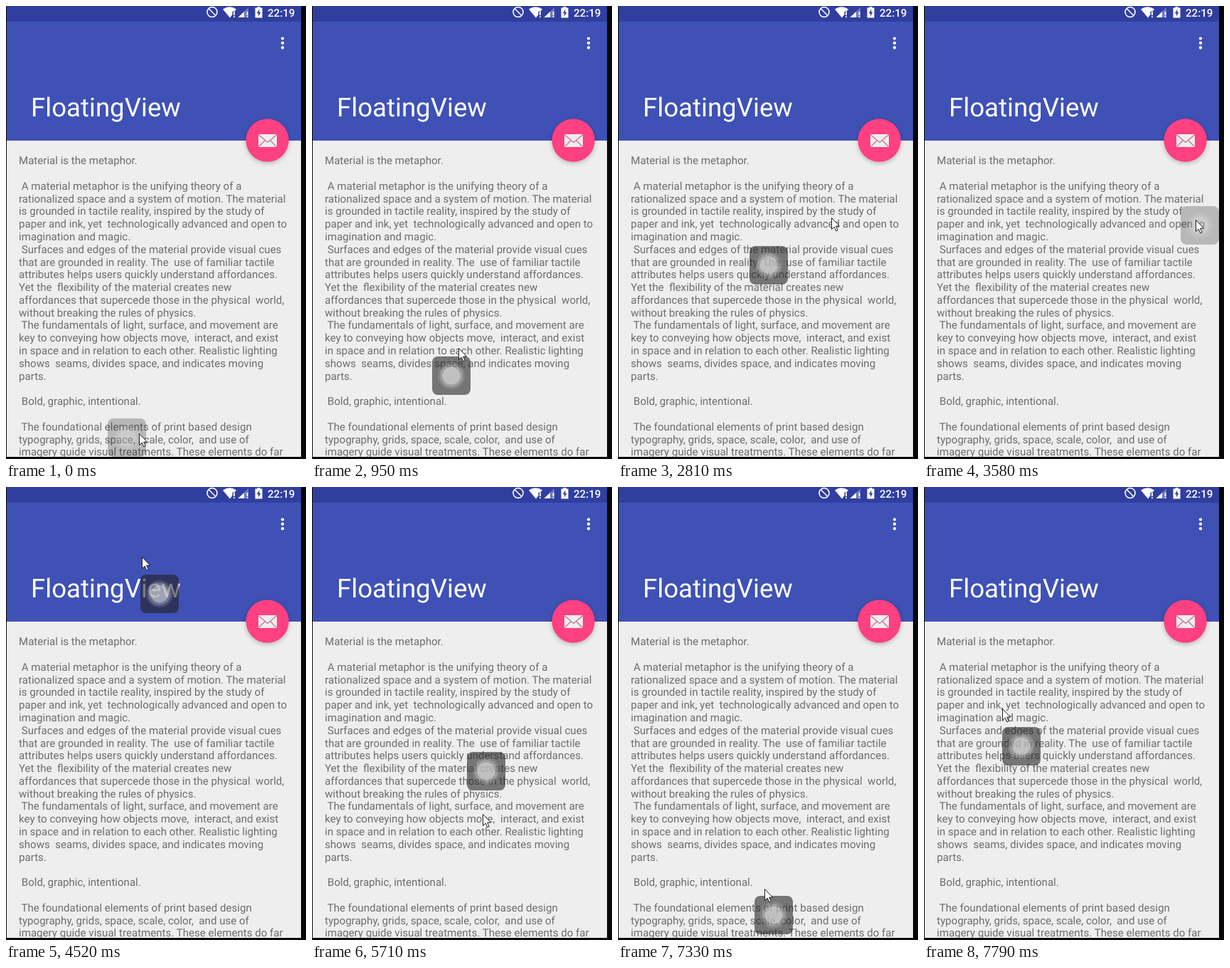
An HTML page with a canvas that plays this animation: 422 by 636 pixels, repeating every 8000 ms.

```html
<!DOCTYPE html>
<html lang="en">
<head>
<meta charset="utf-8">
<title>Floating view</title>
<style>
  html, body { margin: 0; width: 100%; height: 100%; overflow: hidden; background: #080808; }
  canvas { display: block; }
</style>
</head>
<body>
<canvas id="stage" width="422" height="636"></canvas>
<script>
const ctx = document.getElementById('stage').getContext('2d');
ctx.textRendering = 'geometricPrecision';

const LOOP = 8000;
const DP = 414 / 384;   // the phone screen is 384 dp wide
const LAG = 100;        // ms the button trails behind the cursor
const SIZE = 54;
const EDGE = { left: 1, top: 22, right: 415 - SIZE, bottom: 633 - SIZE };

const BODY = `Material is the metaphor.

 A material metaphor is the unifying theory of a
rationalized space and a system of motion. The material
is grounded in tactile reality, inspired by the study of
paper and ink, yet  technologically advanced and open to
imagination and magic.
 Surfaces and edges of the material provide visual cues
that are grounded in reality. The  use of familiar tactile
attributes helps users quickly understand affordances.
Yet the  flexibility of the material creates new
affordances that supercede those in the physical  world,
without breaking the rules of physics.
 The fundamentals of light, surface, and movement are
key to conveying how objects move,  interact, and exist
in space and in relation to each other. Realistic lighting
shows  seams, divides space, and indicates moving
parts.

 Bold, graphic, intentional.

 The foundational elements of print based design
typography, grids, space, scale, color,  and use of
imagery guide visual treatments. These elements do far`.split('\n');

// Turning points of the cursor: time, x, y
const CURSOR = [
  [70, 187, 600], [350, 174, 602], [580, 174, 602], [950, 206, 480], [1550, 144, 360],
  [1650, 113, 303], [1900, 113, 303], [2270, 22, 356], [2710, 205, 356], [2810, 299, 297],
  [2900, 360, 300], [3200, 372, 258], [3600, 382, 300], [4020, 277, 174], [4420, 210, 142],
  [4520, 191, 98], [4910, 191, 98], [5200, 212, 44], [5670, 242, 436], [5900, 216, 530],
  [6240, 216, 530], [6470, 203, 495], [6550, 202, 514], [6940, 217, 600], [7180, 217, 600],
  [7690, 134, 358], [7790, 110, 311]
];
const DRAGS = [
  { press: 580, release: 1650, snap: 1730 },
  { press: 2270, release: 3000, snap: 3040 },
  { press: 3600, release: 4520, snap: 4690 },
  { press: 5200, release: 6000, snap: 6320 },
  { press: 7180, release: LOOP, snap: LOOP }
];

// Monotone cubic interpolation, so that rests stay at rest
function along(path, t, axis) {
  const slope = i => path[i] && path[i + 1]
    ? (path[i + 1][axis] - path[i][axis]) / (path[i + 1][0] - path[i][0]) : 0;
  const tangent = i => {
    const a = slope(i - 1), b = slope(i);
    return a * b > 0 ? 2 * a * b / (a + b) : 0;
  };
  const next = path.findIndex(key => key[0] > t);
  if (next < 0) return path[path.length - 1][axis];
  if (next === 0) return path[0][axis];
  const i = next - 1, span = path[next][0] - path[i][0];
  const u = (t - path[i][0]) / span, v = 1 - u;
  return v * v * ((1 + 2 * u) * path[i][axis] + u * span * tangent(i))
       + u * u * ((1 + 2 * v) * path[next][axis] - v * span * tangent(next));
}

const cursorAt = t => ({ x: along(CURSOR, t, 1), y: along(CURSOR, t, 2) });
const clamp = (v, lo, hi) => Math.min(hi, Math.max(lo, v));

function snapToEdge({ x, y }) {
  return [
    { x: EDGE.left, y }, { x: EDGE.right, y }, { x, y: EDGE.top }, { x, y: EDGE.bottom }
  ].reduce((best, p) =>
    Math.hypot(p.x - x, p.y - y) < Math.hypot(best.x - x, best.y - y) ? p : best);
}

// The button follows the cursor with a delay, then jumps to the nearest edge
function buttonAt(t) {
  let pos = { x: 143, y: EDGE.bottom }, pressed = false;
  for (const { press, release, snap } of DRAGS) {
    if (t < press) break;
    const grab = cursorAt(press);
    const hand = cursorAt(Math.max(press, Math.min(t, release) - LAG));
    pos = {
      x: clamp(pos.x + hand.x - grab.x, EDGE.left, EDGE.right),
      y: clamp(pos.y + hand.y - grab.y, EDGE.top, EDGE.bottom)
    };
    pressed = t < snap;
    if (!pressed) pos = snapToEdge(pos);
  }
  return { ...pos, pressed };
}

function rect(x, y, w, h, color) {
  ctx.fillStyle = color;
  ctx.fillRect(x, y, w, h);
}

function disc(x, y, r, color) {
  ctx.fillStyle = color;
  ctx.beginPath();
  ctx.arc(x, y, r, 0, 7);
  ctx.fill();
}

function text(str, x, y, size, color, weight = 400) {
  ctx.font = `${weight} ${size}px Roboto, sans-serif`;
  ctx.fillStyle = color;
  ctx.fillText(str, x, y);
}

function shape(d, fill, stroke, width = 1) {
  const path = new Path2D(d);
  if (fill) { ctx.fillStyle = fill; ctx.fill(path); }
  if (stroke) { ctx.strokeStyle = stroke; ctx.lineWidth = width; ctx.stroke(path); }
}

function drawWarning(x) {
  rect(x, 8, 1.8, 5, '#fff');
  rect(x, 14.3, 1.8, 1.8, '#fff');
}

function drawStatusBar() {
  rect(1, 0, 414, 22, '#303f9f');
  shape('M297 8.5a7 7 0 1 1-14 0a7 7 0 1 1 14 0M285 3.5L295 13.5', null, '#fff', 1.6);
  shape('M305 4.5Q314.5-2 324 4.5L321.5 7.5H318.5V12L315 16.5Z', '#fff');
  drawWarning(320);
  shape('M341 2V16H326.5Z', 'rgba(255,255,255,.3)');
  shape('M335 8V16H326.5Z', '#fff');
  drawWarning(338.6);
  shape('M350.5 2.5H353.5V1H357.5V2.5H360.5V16.5H350.5Z', '#fff');
  shape('M356.3 4.5L352.8 10.3H355V14.5L358.4 8.7H356.3Z', '#303f9f');
  text('22:19', 368, 14.6, 14 * DP, '#fff', 500);
}

function drawMailButton() {
  ctx.save();
  ctx.shadowColor = 'rgba(0,0,0,.25)';
  ctx.shadowBlur = 6;
  ctx.shadowOffsetY = 2;
  disc(367.6, 188.6, 28 * DP, '#ff4081');
  ctx.restore();
  rect(355, 180, 26, 18, '#eee');
  shape('M355 180.5L368 191.5L381 180.5M355.5 197.5L364.5 188.5M380.5 197.5L371.5 188.5',
    null, '#c9708f', 1.3);
}

function drawPage() {
  rect(0, 0, 422, 636, '#080808');
  rect(1, 22, 414, 167, '#3f51b5');
  rect(1, 189, 414, 444, '#eee');
  drawStatusBar();
  for (const row of [-1, 0, 1]) disc(389, 52 + row * 6 * DP, 2 * DP, '#fff');
  text('FloatingView', 35, 155, 34 * DP, '#fff');
  BODY.forEach((line, i) => text(line, 18, 222.2 + i * 16.5 * DP, 14 * DP, '#6d6d6d'));
  rect(0, 633, 422, 3, '#080808');
  drawMailButton();
}

function drawFloatingButton({ x, y, pressed }) {
  ctx.save();
  ctx.globalAlpha = pressed ? 1 : 0.45;
  ctx.translate(Math.round(x), Math.round(y));
  ctx.beginPath();
  ctx.roundRect(0, 0, SIZE, SIZE, 8);
  ctx.fillStyle = 'rgba(32,32,32,.58)';
  ctx.fill();
  disc(27, 27, 19, 'rgba(255,255,255,.12)');
  disc(27, 27, 16, 'rgba(255,255,255,.2)');
  disc(27, 27, 12.5, 'rgba(255,255,255,.35)');
  ctx.restore();
}

function drawCursor({ x, y }) {
  ctx.save();
  ctx.translate(Math.round(x) + 0.5, Math.round(y) + 0.5);
  shape('M0 0V16L3.7 12.6L6.3 18.4L8.7 17.3L6.2 11.6H11Z', '#fff', '#1c1c28');
  ctx.restore();
}

function render(now) {
  const t = now % LOOP;
  drawPage();
  drawFloatingButton(buttonAt(t));
  drawCursor(cursorAt(t));
  requestAnimationFrame(render);
}
requestAnimationFrame(render);
</script>
</body>
</html>
```
